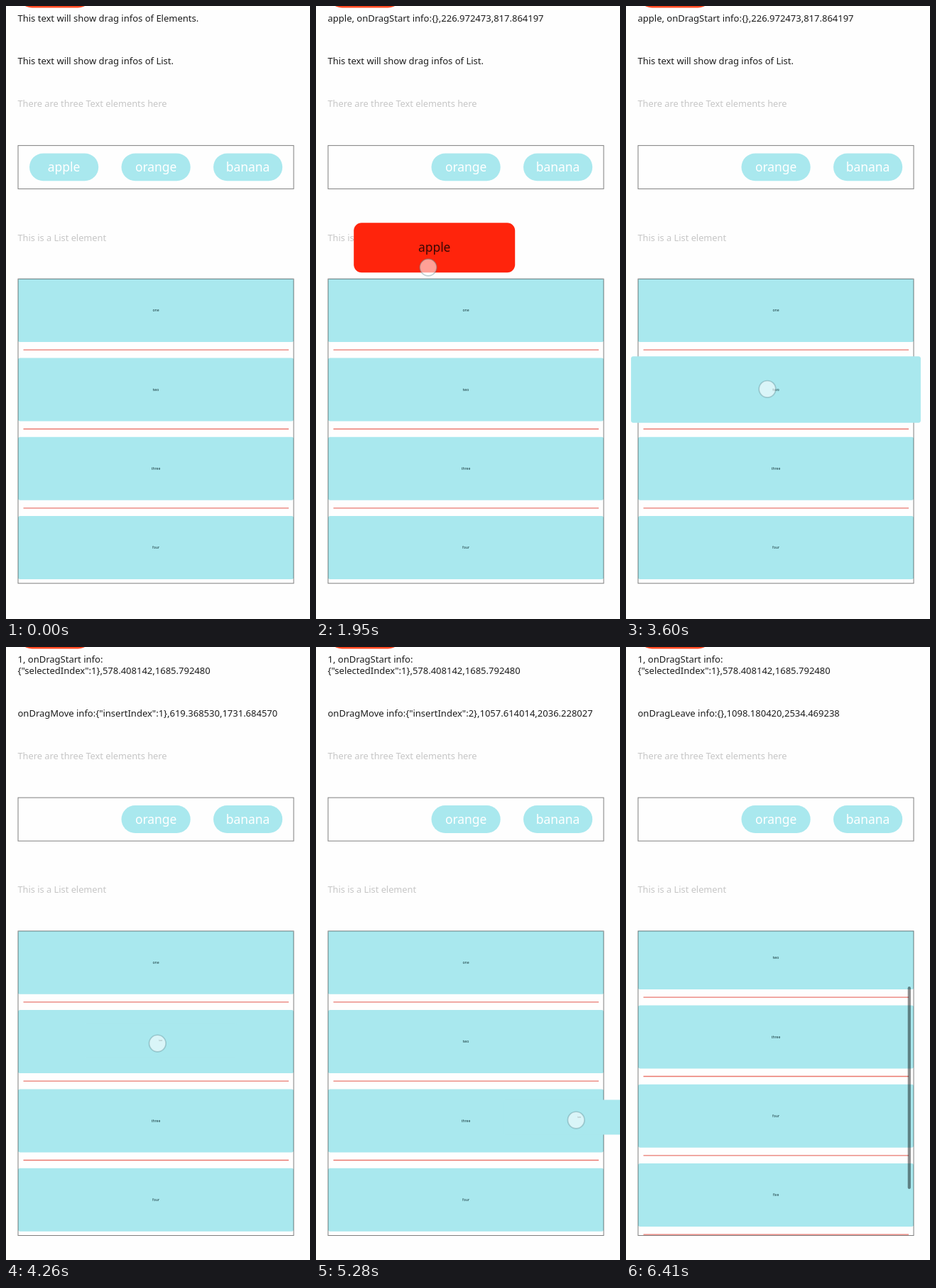
An HTML page that plays this animation: 428x863 px, repeating every 6.76 s.

```html
<!DOCTYPE html>
<html lang="en">
<head>
<meta charset="utf-8">
<title>Drag events</title>
<style>
  html, body { margin: 0; width: 100%; height: 100%; overflow: hidden; background: #fefefe; }
  svg { display: block; width: 428px; height: 863px; font: 13px "Noto Sans", "Open Sans", sans-serif; }
  .info { fill: #1c1c1c; }
  .hint { fill: #c6c6c6; font-size: 12.8px; }
  .frame { fill: none; stroke: #000; stroke-opacity: .5; stroke-width: 1; }
  .teal { fill: #a9e8ee; }
  .pressed .teal { fill: #a2dee5; }
  .label { font-size: 17.4px; text-anchor: middle; fill: #fff; }
  .small { font-size: 5.1px; text-anchor: middle; fill: #17383c; }
  .divider { stroke: #e9776e; stroke-width: 1.3; }
</style>
</head>
<body>
<svg viewBox="0 0 428 863">
  <defs><clipPath id="listClip"><rect x="17" y="384" width="388" height="429"/></clipPath></defs>
  <rect x="17" y="-37" width="104" height="39.5" rx="19.5" fill="#fb4a24"/>
  <text class="info" id="info1" x="16.5" y="22.4"></text>
  <text class="info" id="info1b" x="16.5" y="38"></text>
  <g id="page">
    <text class="info" id="info2" x="16.5" y="82.4"></text>
    <text class="hint" x="16.5" y="142.4">There are three Text elements here</text>
    <rect class="frame" x="17" y="196.4" width="388" height="61"/>
    <g id="pills"></g>
    <text class="hint" x="16.5" y="330.6">This is a List element</text>
    <g clip-path="url(#listClip)">
      <g id="rows"></g>
      <rect id="bar" x="396.7" width="4.2" height="285" rx="2.1" fill="#000" fill-opacity=".45"/>
    </g>
    <rect class="frame" x="17" y="384.2" width="388" height="428.6"/>
  </g>
  <g id="card">
    <rect x="-113.5" y="-35" width="227" height="70" rx="11" fill="#ff240c"/>
    <text class="label" y="6" style="fill:#3a0805">apple</text>
  </g>
  <g id="ghost"></g>
  <circle id="finger" r="11.8" fill="#fff" fill-opacity=".57" stroke="#5d8890" stroke-opacity=".38" stroke-width="1.7"/>
</svg>
<script>
const LOOP = 6760, PITCH = 111.3, SHIFT = 15.7;
const $ = id => document.getElementById(id);

// Stops of the row drag, in device units
const stops = [
  { t: 3650, x: 578.408142, y: 1685.79248 },
  { t: 4260, x: 619.36853, y: 1731.68457 },
  { t: 5000, x: 899.7, y: 1892.3 },
  { t: 5280, x: 1057.614014, y: 2036.228027 },
  { t: 5640, x: 1098.18042, y: 2534.469238 }
];

const progress = (t, from, to) => Math.min(1, Math.max(0, (t - from) / (to - from)));
const mix = (a, b, p) => a + (b - a) * p;

function dragPoint(t) {
  const next = stops.findIndex(s => s.t > t);
  if (next === 0) return stops[0];
  if (next < 0) return stops[stops.length - 1];
  const a = stops[next - 1], b = stops[next], p = progress(t, a.t, b.t);
  return { x: mix(a.x, b.x, p), y: mix(a.y, b.y, p) };
}

const pill = (name, i) => {
  const x = 81.6 + i * 129.5;
  return `<g id="${name}">
    <rect class="teal" x="${x - 48.6}" y="207.4" width="97.2" height="38.8" rx="19.4"/>
    <text class="label" x="${x}" y="233">${name}</text></g>`;
};
const item = (name, x, y) => `
  <rect class="teal" x="${x - 194.2}" y="${y - 44.5}" width="388.4" height="89" rx="3"/>
  <text class="small" x="${x}" y="${y + 1.8}">${name}</text>`;

$('pills').innerHTML = ['apple', 'orange', 'banana'].map(pill).join('');
$('rows').innerHTML = ['one', 'two', 'three', 'four', 'five', 'six'].map((name, i) => {
  const y = 428.6 + i * PITCH, line = y + 55.6;
  return item(name, 211, y) + `<line class="divider" x1="24.5" x2="398" y1="${line}" y2="${line}"/>`;
}).join('');
$('ghost').innerHTML = item('two', 0, 0);

const show = (id, on) => $(id).style.display = on ? '' : 'none';
const write = (id, text) => { if ($(id).textContent !== text) $(id).textContent = text; };
function place(id, x, y, scale = 1, opacity = 1) {
  $(id).setAttribute('transform', `translate(${x} ${y}) scale(${scale})`);
  $(id).setAttribute('opacity', opacity);
}

function renderApple(t) {
  const dragged = t >= 1450, move = progress(t, 1390, 1950), drop = progress(t, 2110, 2240);
  const x = mix(68, 158, move), y = mix(230, 368, move);
  show('apple', !dragged);
  $('apple').classList.toggle('pressed', t >= 990);
  show('card', dragged && drop < 1);
  place('card', x + 8.7 + 4 * drop, y - 27.7 + 5 * drop, 1 + .18 * drop, 1 - drop);
  return { x, y };
}

function renderRow(t, device) {
  const dragged = t >= 3670, drop = progress(t, 6350, 6410);
  const lift = progress(t, 3320, 3600), shrink = progress(t, 3670, 3900);
  const x = device.x / 2.866 - 2.8, y = device.y / 2.82 - 56 - (t < 3650 ? 2.5 : 0);
  const scale = (1 + .05 * lift - .5 * shrink) * (1 + .12 * drop);
  show('ghost', lift > 0 && drop < 1);
  if (dragged) place('ghost', x + mix(12.5, 4.5, shrink), y + mix(0, -4, shrink), scale, 1 - drop);
  else place('ghost', 211, 539.9, scale);
  return { x, y };
}

function render(t) {
  const appleDragged = t >= 1450, rowDragged = t >= 3670;
  const device = dragPoint(Math.floor(t / 20) * 20);
  const applePoint = renderApple(t), rowPoint = renderRow(t, device);
  const finger = t < 2500 ? applePoint : rowPoint;
  show('finger', t >= 990 && t < 2110 || t >= 2970 && t < 6350);
  place('finger', finger.x, finger.y);

  const scroll = 118 * progress(t, 5420, 5700);
  place('rows', 0, -scroll);
  show('bar', scroll > 0);
  $('bar').setAttribute('y', 384 + scroll * 429 / 646);
  place('page', 0, rowDragged ? SHIFT : 0);

  write('info1', rowDragged ? '1, onDragStart info:'
    : appleDragged ? 'apple, onDragStart info:{},226.972473,817.864197'
    : 'This text will show drag infos of Elements.');
  write('info1b', rowDragged ? '{"selectedIndex":1},578.408142,1685.792480' : '');
  const index = Math.floor((rowPoint.y - 500) / PITCH) + 1;
  write('info2', t >= 5640 ? 'onDragLeave info:{},1098.180420,2534.469238'
    : rowDragged ? `onDragMove info:{"insertIndex":${index}},${device.x.toFixed(6)},${device.y.toFixed(6)}`
    : 'This text will show drag infos of List.');
}

const start = performance.now();
function tick() {
  render((performance.now() - start) % LOOP);
  requestAnimationFrame(tick);
}
tick();
</script>
</body>
</html>
```
